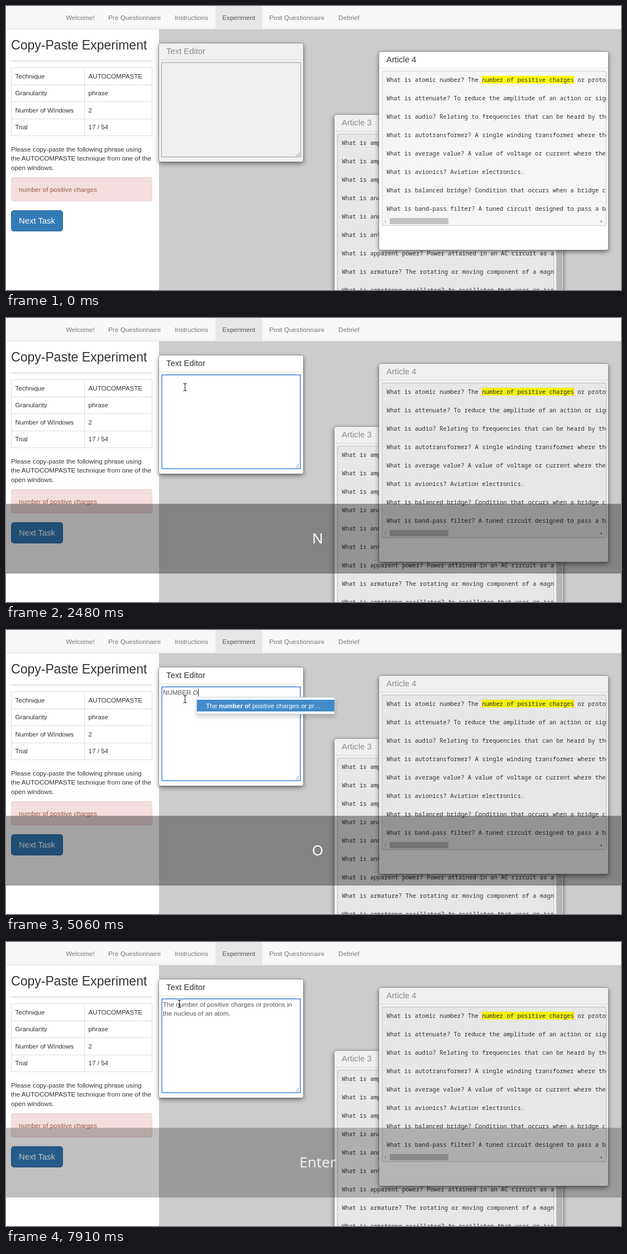
Write an HTML page that moves like this. It is 1101 px wide and 509 px high and loops after 8000 ms.

```html
<!DOCTYPE html>
<html lang="en">
<head>
<meta charset="utf-8">
<title>Copy-Paste Experiment</title>
<style>
* { box-sizing: border-box; }
html, body { margin: 0; width: 100%; height: 100%; overflow: hidden; }
body { position: relative; background: #ccc; color: #333; font: 11.65px/16.47px "Liberation Sans", Arial, sans-serif; }
nav, aside, .win, .win > *, .abs { position: absolute; }

nav { left: 0; top: 0; width: 100%; height: 42px; background: #f8f8f8; border-bottom: 1px solid #e0e0e0; color: #777; }
nav span { position: absolute; top: 0; height: 41px; line-height: 41px; padding: 0 12.3px; white-space: nowrap; }
nav .here { background: #e7e7e7; color: #555; width: 84px; }

aside { left: 0; top: 42px; width: 274px; height: 467px; background: #fff; }
aside > * { position: absolute; left: 9px; width: 253px; margin: 0; }
h1 { top: 14px; font-size: 23.06px; line-height: 28px; font-weight: 400; white-space: nowrap; }
hr { top: 56px; height: 1px; border: 0; background: #c8c8c8; }
table { top: 68px; height: 123px; border-collapse: collapse; table-layout: fixed; }
td { border: 1px solid #ddd; padding: 0 6.5px; height: 30.4px; }
td:first-child { width: 131px; }
.task { top: 207px; white-space: nowrap; }
.phrase { top: 264.5px; height: 43px; padding: 0 13px; line-height: 41px; background: #f2dede; border: 1px solid #ebccd1; border-radius: 3.3px; color: #9e5746; }
.next { top: 324px; width: 93px; height: 38px; line-height: 36px; text-align: center; font-size: 14.82px; color: #fff; background: #337ab7; border: 1px solid #2e6da4; border-radius: 5px; }

.win { background: #fff; border-radius: 4px; overflow: hidden; }
.shade { border-radius: 4px; box-shadow: 0 0 0 .7px #808080, 0 3px 8px rgba(0,0,0,.55); }
.win::after { content: ""; position: absolute; inset: 0; background: rgba(0,0,0,.06); }
.win.on::after { display: none; }
.win h2 { left: 13px; top: 4px; margin: 0; font-size: 14.82px; line-height: 21px; font-weight: 400; color: #939393; white-space: nowrap; }
.win.on h2 { color: #333; }
.rule { left: 0; top: 29px; width: 100%; height: 1px; background: #e5e5e5; }
pre { left: 4.5px; top: 34px; width: 402px; height: 278px; margin: 0; padding: 0 0 0 8.8px; overflow: hidden; background: #f5f5f5; box-shadow: inset 0 0 0 1px #ccc; border-radius: 3.3px; font: 10.56px/32.94px "Noto Sans Mono", "DejaVu Sans Mono", monospace; }
mark { background: #ff0; color: inherit; }
.thumb { background: #c1c1c1; }
.tri { border: 2.5px solid transparent; width: 0; height: 0; }

.pad { left: 4px; top: 34px; width: 250px; height: 170px; padding: 2px 0 0 2px; border: 1px solid #a9a9a9; color: #555; white-space: pre; }
.on .pad { border: 2px solid #6ea3ea; padding: 1px 0 0 1px; }
.caret { display: inline-block; width: 1px; height: 14px; margin-right: -1px; background: #222; vertical-align: -3px; }
.pad svg { position: absolute; right: 0; bottom: 0; }

#menu { top: 120px; width: 248px; padding: 4px 0; background: #fff; border: 1px solid rgba(0,0,0,.2); border-radius: 3.3px; box-shadow: 0 5px 8px rgba(0,0,0,.18); }
#menu div { height: 21.4px; padding-left: 16px; line-height: 21.4px; white-space: nowrap; }
#menu div:first-child { background: #428bca; color: #fff; }
#band { left: 0; top: 332.5px; width: 100%; height: 125px; background: rgba(0,0,0,.36); }
#key { left: 458px; width: 200px; top: 42px; line-height: 38px; text-align: center; font-family: "Noto Sans", "Open Sans", sans-serif; font-size: 26px; color: #fff; }
#mouse { left: 0; top: 0; overflow: visible; }
</style>
</head>
<body>
<nav>
  <span style="left:95px">Welcome!</span>
  <span style="left:171px">Pre Questionnaire</span>
  <span style="left:290px">Instructions</span>
  <span class="here" style="left:375px">Experiment</span>
  <span style="left:459px">Post Questionnaire</span>
  <span style="left:583px">Debrief</span>
</nav>

<aside>
  <h1>Copy-Paste Experiment</h1>
  <hr>
  <table>
    <tr><td>Technique<td>AUTOCOMPASTE
    <tr><td>Granularity<td>phrase
    <tr><td>Number of Windows<td>2
    <tr><td>Trial<td>17 / 54
  </table>
  <div class="task">Please copy-paste the following phrase using<br>the AUTOCOMPASTE technique from one of the<br>open windows.</div>
  <div class="phrase">number of positive charges</div>
  <div class="next">Next Task</div>
</aside>

<div class="abs shade" style="left:588px;top:195px;width:409px;height:400px"></div>
<section class="win" style="left:588px;top:195px;width:409px;height:400px">
  <h2>Article 3</h2><div class="rule"></div>
  <pre style="width:388px;height:380px">What is ampere? A unit of current.
What is ampere-hour? Current over time.
What is amplifier? A circuit that adds gain.
What is analog? Continuously variable.
What is and gate? A logic circuit.
What is antenna? A device that radiates.
What is apparent power? Power attained in an AC circuit as a result
What is armature? The rotating or moving component of a magnetic
What is armstrong oscillator? An oscillator that uses an isolation</pre>
  <div class="thumb" style="left:397px;top:30px;width:11px;height:370px"></div>
</section>

<div class="abs shade" style="left:668px;top:82px;width:410px;height:355px"></div>
<section class="win" id="article" style="left:668px;top:82px;width:410px;height:355px">
  <h2>Article 4</h2><div class="rule"></div>
  <pre>What is atomic number? The <mark>number of positive charges</mark> or protons in
What is attenuate? To reduce the amplitude of an action or signal
What is audio? Relating to frequencies that can be heard by the
What is autotransformer? A single winding transformer where the
What is average value? A value of voltage or current where the
What is avionics? Aviation electronics.
What is balanced bridge? Condition that occurs when a bridge circuit
What is band-pass filter? A tuned circuit designed to pass a band</pre>
  <div class="tri" style="left:8px;top:301.5px;border-right-color:#999"></div>
  <div class="thumb" style="left:19px;top:298px;width:105px;height:11px"></div>
  <div class="tri" style="left:397px;top:301.5px;border-left-color:#444"></div>
</section>

<div class="abs shade" style="left:274px;top:67px;width:258px;height:212px"></div>
<section class="win" id="editor" style="left:274px;top:67px;width:258px;height:212px">
  <h2>Text Editor</h2><div class="rule"></div>
  <div class="pad"><span id="typed"></span><i class="caret" id="caret"></i>
    <svg width="8" height="8" stroke="#777" stroke-width=".9"><path d="M1 7 7 1M4.5 7 7 4.5"/></svg>
  </div>
</section>

<div class="abs" id="menu"></div>
<div class="abs" id="band"><div class="abs" id="key"></div></div>
<svg class="abs" id="mouse" width="1" height="1">
  <path id="arrow" d="M-1-1V12L2 9.4 4.3 14.4 6.6 13.4 4.4 8.6H8.4Z" fill="#fff" stroke="#000" stroke-width=".9"/>
  <path id="beam" d="M-3-6.5H-1L0-5.8 1-6.5H3M0-5.8V5.8M-3 6.5H-1L0 5.8 1 6.5H3" fill="none" stroke="#222" stroke-width="1.1"/>
</svg>

<script>
const $ = id => document.getElementById(id);
const LOOP = 8000;
const pasted = "The number of positive charges or protons in\nthe nucleus of an atom. ";
const choices = ["12 is the number", "What is atomic number?", "The number of positive charges or pr…"];

// Each track lists [start time, value] and holds the value until the next entry.
const keys = [[0, ""], [2480, "N"], [2780, "U"], [3030, "M"], [3250, "B"], [3480, "E"], [3640, "R"],
  [4500, "Space"], [4670, "O"], [6060, "Enter"]];
const typing = [[0, ""], [2570, "N"], [2860, "NU"], [3100, "NUM"], [3330, "NUMB"], [3560, "NUMBE"],
  [3710, "NUMBER"], [4580, "NUMBER "], [4990, "NUMBER O"], [6140, pasted]];
const menuLeft = { NUMB: 308.3, NUMBE: 318.3, NUMBER: 328.3, "NUMBER ": 331.6, "NUMBER O": 341 };
const caretOn = [[0, 0], [1550, 1], [1970, 0], [2570, 1], [7460, 0]];
const bandFade = [[0, 0], [2480, 1], [7460, .9], [7540, .8], [7620, .7], [7860, .68]];

const at = (track, t) => track.findLast(entry => entry[0] <= t)[1];

function mouseAt(t) {
  if (t >= 7310) return [310.5, 111];
  if (t >= 7240) return [315.5, 118];
  const p = Math.min(1, Math.floor((t - 230) / 77) / 10);
  const ease = Math.sin(p * Math.PI / 2);
  return [538.5 - 218 * ease, 337 - 213 * ease];
}

function drawMenu(text) {
  const left = menuLeft[text];
  $("menu").style.display = left ? "" : "none";
  if (!left) return;
  $("menu").style.left = left + "px";
  const query = text.toLowerCase().trim();
  $("menu").innerHTML = choices.filter(choice => choice.includes(query))
    .map(choice => `<div>${choice.replace(query, "<b>$&</b>")}</div>`).join("");
}

let shown;
function render(t) {
  const text = at(typing, t);
  if (text !== shown) {
    shown = text;
    $("typed").textContent = text;
    drawMenu(text);
  }
  const focused = t >= 1550;
  $("editor").classList.toggle("on", focused);
  $("article").classList.toggle("on", !focused);
  $("caret").style.visibility = at(caretOn, t) ? "visible" : "hidden";
  $("key").textContent = at(keys, t);
  $("band").style.opacity = at(bandFade, t);

  const [x, y] = mouseAt(t);
  const overMenu = t >= 3330 && t < 3790;
  const overPad = x < 528 && y < 271 && !overMenu;
  $("mouse").style.display = t < 230 ? "none" : "";
  $("mouse").style.transform = `translate(${x}px, ${y}px)`;
  $("beam").style.display = overPad ? "" : "none";
  $("arrow").style.display = overPad ? "none" : "";
}

const start = performance.now();
function tick() {
  render((performance.now() - start) % LOOP);
  requestAnimationFrame(tick);
}
tick();
</script>
</body>
</html>
```
